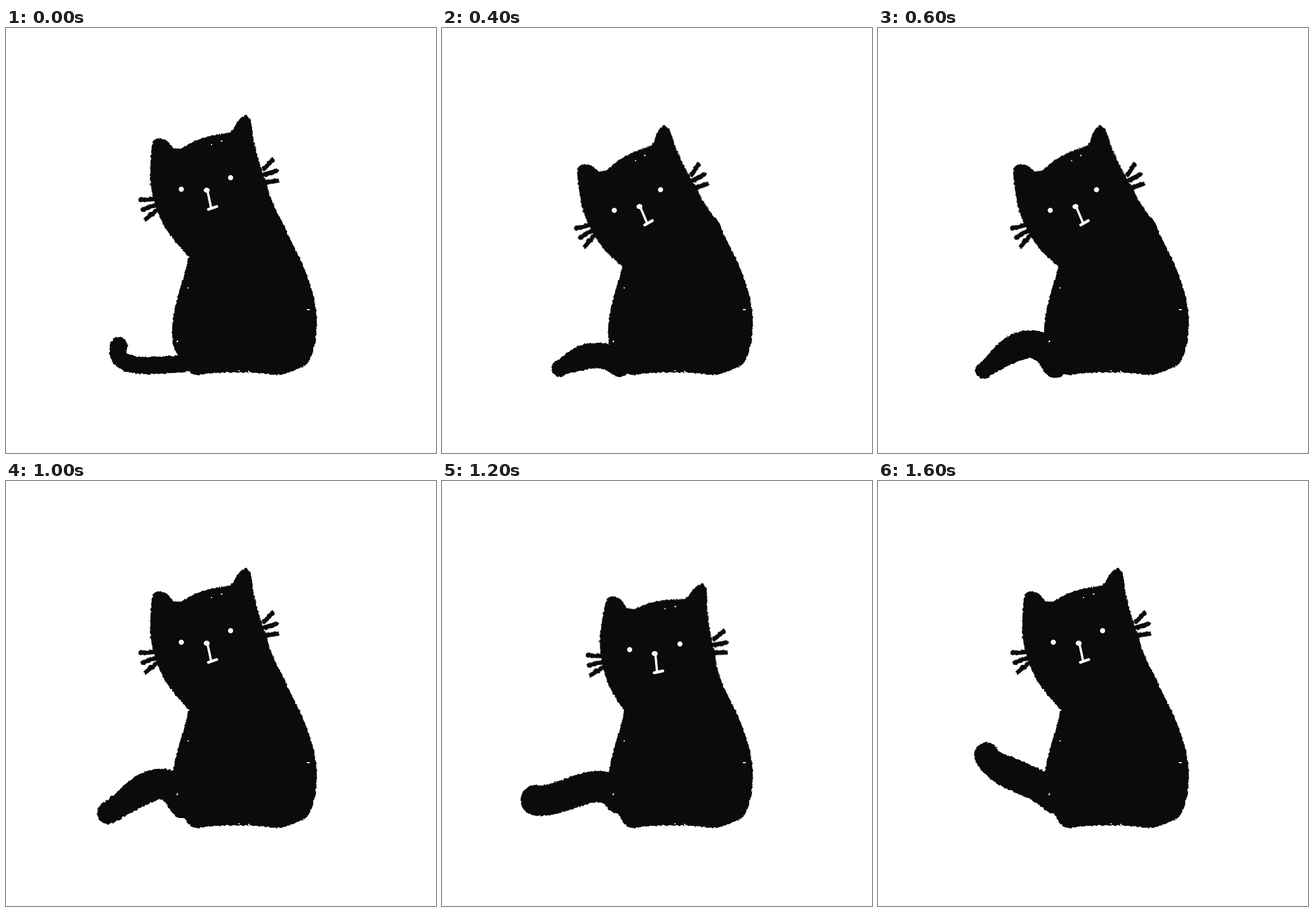
Recreate the animation shown at these times as an HTML page. Size 753 by 744 pixels, loop 1800 ms.

```html
<!DOCTYPE html>
<html lang="en">
<head>
<meta charset="utf-8">
<title>Black cat</title>
<style>
  html, body { margin: 0; width: 100%; height: 100%; overflow: hidden; background: #fff; }
  svg { display: block; width: 753px; height: 744px; }
  .ink { fill: #0b0b0b; stroke: #0b0b0b; filter: url(#rough); }
  .whiskers { stroke-width: 8; stroke-linecap: round; }
  .face { fill: #fff; stroke: #fff; stroke-linecap: round; }
  .specks { fill: none; stroke: #fff; stroke-width: 2; }
</style>
</head>
<body>
<svg viewBox="0 0 753 744" xmlns="http://www.w3.org/2000/svg">
  <defs>
    <filter id="rough" filterUnits="userSpaceOnUse" x="0" y="0" width="753" height="744"
            color-interpolation-filters="sRGB">
      <feTurbulence type="fractalNoise" baseFrequency=".22" numOctaves="2" seed="4"/>
      <feDisplacementMap in="SourceGraphic" scale="4.5" xChannelSelector="R" yChannelSelector="G"/>
    </filter>
  </defs>
  <g class="ink"><path id="tail"/></g>
  <g class="ink">
    <path d="M480 333Q488 351 498 371C521 417 543 460 544 520Q542 565 528 587Q510 600 480 607
             Q400 597 335 607Q325 607 320 600L296 564Q286 530 297 488Q303 460 312 433
             Q316 420 319 404L330 385Z"/>
  </g>
  <path class="specks" d="M527 493h5M299 550l2-3M318 455h2M407 600h2M424 601h2"/>
  <g id="head">
    <g class="ink">
      <path d="M254 275Q252 235 256 205Q259 190 273 194Q284 197 293 211Q302 212 308 211
               Q342 188 386 185L398 179Q406 158 419 153Q428 153 430 175Q436 220 457 277
               Q465 309 484 341L450 395L350 420L319 399C300 375 268 355 254 275Z"/>
      <path class="whiskers" d="M452 246L467 231M452 257L473 250M454 271L475 267
               M262 299L236 301M262 310L239 318M264 319L245 334"/>
    </g>
    <g class="face">
      <g stroke="none">
        <circle cx="307" cy="282.3" r="4.5"/>
        <circle cx="393.3" cy="262" r="4.5"/>
        <ellipse cx="351.5" cy="284" rx="5.3" ry="4.4"/>
      </g>
      <path d="M353 286L359 314" stroke-width="4"/>
      <path d="M354.500 317.500L369 312.500" stroke-width="5"/>
    </g>
    <path class="specks" d="M359 204h2M376 198h3"/>
  </g>
</svg>
<script>
const STEP = 200;
const head = document.getElementById('head');
const tail = document.getElementById('tail');

// Head poses: shift and turn about the point between the eyes
const EYES = [350, 272];
const lean = [0, 0, 0];
const tilt = [-8, 29, -10.8];
const sink = [-10.5, 30, -10.8];
const perk = [21, 3, 6.8];
const sit = [22.5, 18, 6.8];

// Each step: head pose, tail tip, curl handle at the tip, height of the arch, tip radius
const steps = [
  { pose: lean, tip: [198, 556], curl: [182, 605], arch: 588, r: 14.5 },
  { pose: perk, tip: [194, 594], curl: [230, 597], arch: 585, r: 18.5 },
  { pose: tilt, tip: [206, 596], curl: [235, 580], arch: 558, r: 14 },
  { pose: tilt, tip: [185, 600], curl: [222, 570], arch: 519, r: 14 },
  { pose: sink, tip: [199, 596], curl: [215, 545], arch: 505, r: 13 },
  { pose: lean, tip: [179, 581], curl: [225, 555], arch: 492, r: 19 },
  { pose: sit,  tip: [164, 559], curl: [215, 565], arch: 505, r: 26 },
  { pose: lean, tip: [181, 521], curl: [215, 545], arch: 512, r: 22 },
  { pose: lean, tip: [190, 479], curl: [200, 510], arch: 520, r: 21 }
];

const mix = (a, b, t) => a + (b - a) * t;
const smooth = t => {
  t = Math.max(0, Math.min(1, t));
  return t * t * (3 - 2 * t);
};

function bezier(a, b, c, d, t) {
  const s = 1 - t;
  return s * s * s * a + 3 * s * s * t * b + 3 * s * t * t * c + t * t * t * d;
}

// Overlapping discs from tip to root; the root thickens and rises through the loop
function brush({ tip, curl, arch, r }, i) {
  const girth = mix(27, 14.5, (1 - i / 8) ** 3);
  const rootY = mix(588, 555, smooth((i - 3) / 3));
  let d = '';
  for (let t = 0; t <= 1; t += 1 / 64) {
    const x = bezier(tip[0], curl[0], 275, 311, t);
    const y = bezier(tip[1], curl[1], arch, rootY, t);
    const w = mix(r, girth, smooth(t * 2));
    d += `M${x - w} ${y}a${w} ${w} 0 1 1 ${2 * w} 0a${w} ${w} 0 1 1 ${-2 * w} 0z`;
  }
  return d;
}

const strokes = steps.map(brush);

let shown = -1;
function show(i) {
  if (i === shown) return;
  shown = i;
  const [dx, dy, turn] = steps[i].pose;
  tail.setAttribute('d', strokes[i]);
  head.setAttribute('transform', `translate(${dx} ${dy}) rotate(${turn} ${EYES})`);
}

const start = performance.now();
function tick() {
  show(Math.floor((performance.now() - start) / STEP) % steps.length);
  requestAnimationFrame(tick);
}
tick();
</script>
</body>
</html>
```
